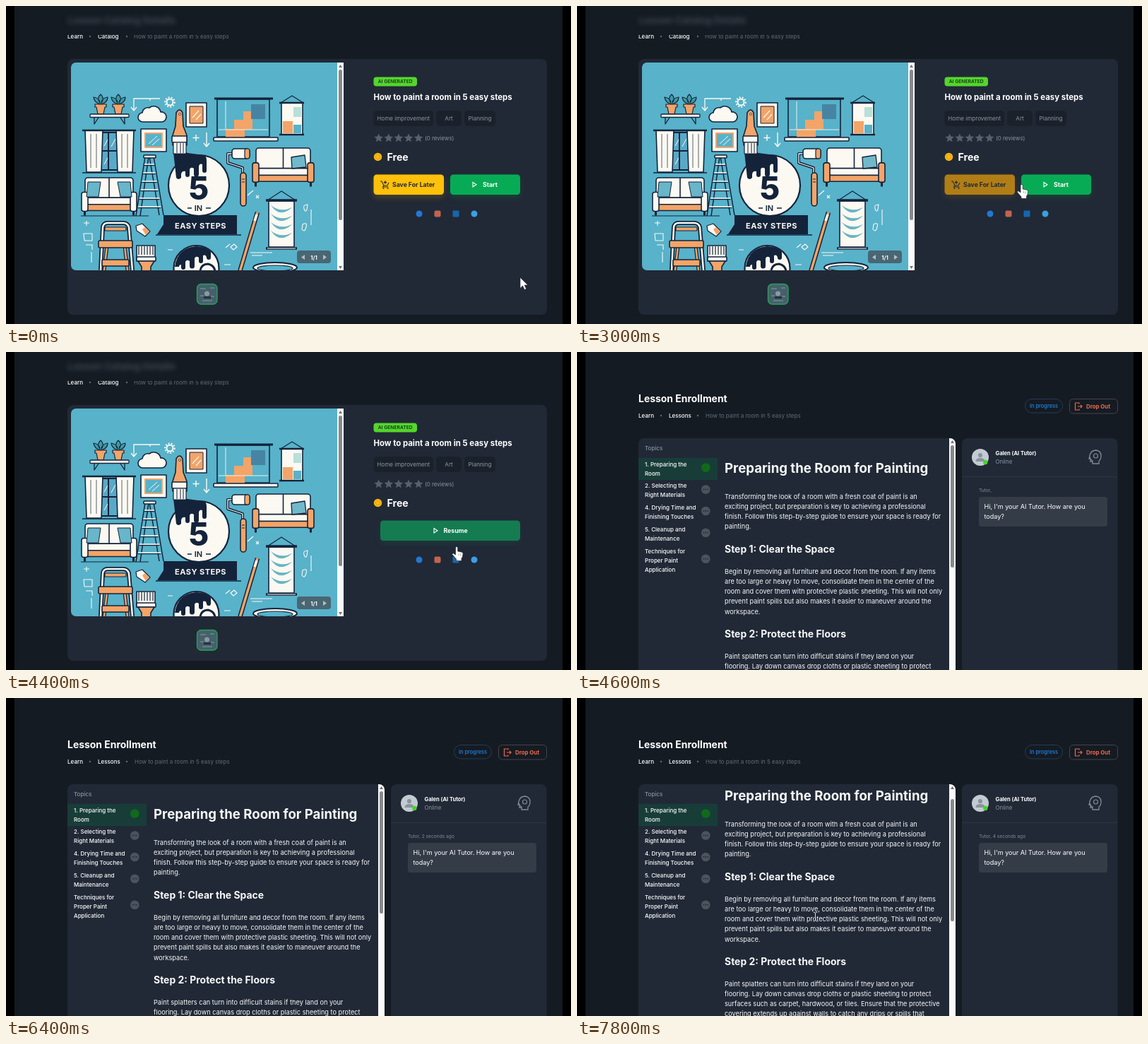
These frames come from a looping animation (800x450 px, 8000 ms). An HTML page with a canvas:

```html
<!DOCTYPE html>
<html lang="en">
<head>
<meta charset="utf-8">
<title>Lesson walkthrough</title>
<style>
html, body { margin: 0; width: 100%; height: 100%; overflow: hidden; background: #000; }
canvas { display: block; width: 800px; height: 450px; }
</style>
</head>
<body>
<canvas id="stage" width="800" height="450"></canvas>
<script>
const ctx = document.getElementById('stage').getContext('2d');
const LOOP = 8000, STEP = 200, PAGE_SWITCH = 4600;
const PAGE = '#151b23', CARD = '#212936', WHITE = '#fff', MUTED = '#8a95a1', DIM = '#626c77';
const NAVY = '#14233a', CREAM = '#fbf9f2', ORANGE = '#f3a468', SKY = '#57b2ca', BLUE = '#4784a4';

// Drawing helpers
function paint(fill, stroke, width = 1.6) {
  if (fill) { ctx.fillStyle = fill; ctx.fill(); }
  if (stroke) { ctx.strokeStyle = stroke; ctx.lineWidth = width; ctx.stroke(); }
}
function box(x, y, w, h, fill, r = 0, stroke, width) {
  ctx.beginPath();
  ctx.roundRect(x, y, w, h, r);
  paint(fill, stroke, width);
}
function disc(x, y, r, fill, stroke, width) {
  ctx.beginPath();
  ctx.arc(x, y, r, 0, Math.PI * 2);
  paint(fill, stroke, width);
}
function oval(x, y, rx, ry, fill, stroke, width) {
  ctx.beginPath();
  ctx.ellipse(x, y, rx, ry, 0, 0, Math.PI * 2);
  paint(fill, stroke, width);
}
function shape(path, fill, stroke, width) {
  const p = new Path2D(path);
  if (fill) { ctx.fillStyle = fill; ctx.fill(p); }
  if (stroke) { ctx.strokeStyle = stroke; ctx.lineWidth = width || 1.6; ctx.stroke(p); }
}
function line(path, color = NAVY, width = 1.6) { shape(path, null, color, width); }
function text(str, x, y, size, color = WHITE, weight = 400, align = 'left') {
  ctx.font = `${weight} ${size}px Inter, sans-serif`;
  ctx.textAlign = align;
  ctx.fillStyle = color;
  ctx.fillText(str, x, y);
}
function lines(rows, x, y, gap, size, color, weight) {
  rows.forEach((row, i) => text(row, x, y + i * gap, size, color, weight));
}
function clipped(x, y, w, h, r, draw) {
  ctx.save();
  ctx.beginPath();
  ctx.roundRect(x, y, w, h, r);
  ctx.clip();
  draw();
  ctx.restore();
}
function at(x, y, draw) {
  ctx.save();
  ctx.translate(x, y);
  draw();
  ctx.restore();
}

function breadcrumb(section, end, y) {
  text('Learn', 87, y, 8.1, WHITE, 500);
  text(section, 130, y, 8, WHITE, 500);
  disc(119, y - 3, 1.2, DIM);
  disc(171, y - 3, 1.2, DIM);
  text('How to paint a room in 5 easy steps', end, y, 7.97, DIM);
}
function scrollbar(x, top, bottom, thumbY, thumbH) {
  box(x, top, 9, bottom - top, '#fafafa');
  box(x + 2, thumbY, 5, thumbH, '#88898b', 2.5);
  shape(`M${x + 2} ${top + 7}h5l-2.5-4z`, '#707274');
  shape(`M${x + 2} ${bottom - 6}h5l-2.5 4z`, '#707274');
}

// Illustration
function plant(x) {
  shape(`M${x} 139q-9-2-10-10q8 1 9 8q-5-7 1-12q6 5 1 12q1-7 9-8q0 8-10 10`, '#3f9aa5', NAVY, 1.2);
  shape(`M${x - 8} 139h16v4h-2l-2 10h-8l-2-10h-2z`, ORANGE, NAVY, 1.2);
}
function sofa(x, y, w, h, armColor) {
  box(x + 5, y, w - 10, h * .62, CREAM, 4, NAVY);
  line(`M${x + w / 2} ${y}v${h * .55}`);
  box(x + 8, y + h * .52, w - 16, h * .18, CREAM, 2, NAVY);
  box(x + 4, y + h * .7, w - 8, h * .16, ORANGE, 1, NAVY);
  for (const armX of [x, x + w - 9]) {
    box(armX, y + h * .38, 9, h * .5, armColor, 3, NAVY);
    line(`M${armX + 4.5} ${y + h * .88}v${h * .11}`, NAVY, 3);
  }
}
function room() {
  plant(134);
  plant(159);
  box(119, 153, 55, 4.5, CREAM, 1, NAVY, 1.3);
  line('M125 158v9l6-9M168 158v9l-6-9', NAVY, 1.3);
  line('M218 131h-37v16m-4-4l4 5l4-5M204 131v3', CREAM, 1.3);
  disc(232, 136, 4.5, null, CREAM, 2);
  ctx.setLineDash([2, 2.2]);
  disc(232, 136, 6.8, null, CREAM, 2);
  ctx.setLineDash([]);
  shape('M194 164a6.5 6.5 0 0 1-1-13a8 8 0 0 1 10-7a10 10 0 0 1 16 6a7 7 0 0 1 2 14z', CREAM, NAVY);

  box(255, 137, 29, 34, CREAM, 0, NAVY);
  box(260, 142, 19, 24, ORANGE, 0, NAVY, 1);
  line('M264 158l9-10M269 161l7-8', CREAM, 1.2);
  box(191, 174, 36, 32, CREAM, 0, NAVY);
  box(197, 180, 24, 20, SKY, 0, ORANGE, 2);
  line('M202 195l12-11M207 197l10-9', CREAM, 1);

  // Window and curtains
  box(131, 179, 28, 53, '#58a9c7', 0, NAVY, 2);
  line('M145 179v53M131 205h28', NAVY, 2);
  line('M139 198l5-9M149 199l6-11M139 224l5-9', CREAM, 1);
  for (const x of [112, 156]) {
    shape(`M${x} 176h25l-2 59h-21z`, CREAM, NAVY);
    line(`M${x + 8} 181v48M${x + 16} 181v48`, NAVY, .7);
  }
  line('M108 176h76', NAVY, 2.5);
  line('M108 236h76', NAVY, 1.6);

  sofa(107, 243, 78, 54, CREAM);
  shape('M116 249h18l-3 21h-17zM158 249h18l2 21h-16z', '#69b5ca', NAVY, 1);
  line('M106 297h96', NAVY, 1.2);

  // Ladder
  line('M197 213l-13 84M202 213l-12 84M209 213l14 83M203 213l14 83', NAVY, 1.5);
  for (let i = 0; i < 6; i++) {
    const y = 224 + i * 12, half = 7 + i * 1.8;
    line(`M${203 - half} ${y}h${half * 2}`, CREAM, 1.3);
    line(`M${203 - half} ${y + 1.6}h${half * 2}`, NAVY, 1.2);
  }
  box(195, 211, 17, 4, CREAM, 1, NAVY);

  // Wall chart
  box(299, 132, 74, 53, SKY, 0, NAVY);
  shape('M311 186v-12h12v-13h13v-12h13v26h-11v11z', ORANGE);
  line('M301 175h70M311 174v-39', CREAM, .9);
  box(347, 139, 20, 21, BLUE);
  line('M295 131h83', NAVY, 3);
  box(294, 186, 91, 5, CREAM, 1, NAVY);
  line('M389 137l16-10l16 10', NAVY, 1.2);
  box(390, 137, 30, 45, CREAM, 0, NAVY);
  box(392, 163, 14, 17, ORANGE);
  box(407, 143, 11, 14, '#b8dfd8');
  box(407, 168, 11, 12, SKY);
  line('M387 137h35M387 182h35', NAVY, 2.5);

  line('M269 182v9M264.5 186.5h9M284 179v20m-4-5l4 5l4-5', CREAM, 1.4);
  line('M250 283l4 4m0-4l-4 4M354 268l4 4m0-4l-4 4M342 268l8-7', CREAM, 1.2);

  // Roller
  line('M321 209h-7v13l21 7v8', NAVY, 4);
  line('M321 209h-7v13l21 7v8', CREAM, 1.3);
  box(320, 202, 25, 14, CREAM, 4, NAVY);
  box(338, 202, 7, 14, ORANGE, 3, NAVY, 1.2);
  box(332, 236, 8, 47, ORANGE, 4, NAVY);
  line('M334 245h4M334 249h4', NAVY, 1);

  sofa(349, 201, 87, 55, ORANGE);
  shape('M404 214l19-3l2 17l-20 2z', '#70b8ca', NAVY, 1.3);

  // Hanging poster
  line('M370 275l20-13l20 13', NAVY, 1.2);
  box(372, 276, 36, 65, CREAM, 0, NAVY);
  for (let i = 0; i < 4; i++) {
    shape(`M375 ${282 + i * 12}q14 11 30 3q-17 16-30-3`, '#69b5c4');
  }
  line('M368 275h44M368 343h44', NAVY, 3.5);
  line('M370 343h40', CREAM, 1);
}
function tools() {
  // Headline medallion
  disc(273, 254, 43, CREAM, NAVY, 2.2);
  shape('M237 207q10-4 20 1l23 3q4 1 4 8v14a3 3 0 0 1-6 0v-9q-4-2-5 3v11a3.5 3.5 0 0 1-7 0v-8q-4-3-6 1v8a3 3 0 0 1-6 0v-5q-5-1-6 4v5q-4 4-7 0z', NAVY);
  shape('M241 151q5-8 9 0l1 19l5 13v14h-20v-14l4-13z', ORANGE, NAVY);
  box(235, 184, 21, 9, CREAM, 1, NAVY);
  box(237, 193, 18, 16, CREAM, 0, NAVY, 1.2);
  line('M242 194v14M247 194v14M251 194v14', NAVY, 1);
  disc(246, 153, 1.5, CREAM, NAVY, .8);
  text('5', 273, 274, 45, NAVY, 800, 'center');
  text('IN', 272.5, 290, 11, NAVY, 600, 'center');
  line('M257 286h6M283 286h7', NAVY, 1.5);
  shape('M223 296h104v27h-113l9-14z', NAVY);
  line('M212 324h121', NAVY, 1.5);
  ctx.letterSpacing = '0.5px';
  text('EASY STEPS', 275.5, 314.5, 11, CREAM, 700, 'center');
  ctx.letterSpacing = '0px';

  // Step stool
  line('M134 374l3-61q1-6 7-6h22q6 0 8 6l5 61', NAVY, 6);
  line('M134 374l3-61q1-6 7-6h22q6 0 8 6l5 61', CREAM, 2.5);
  line('M143 340l-4 34M168 340l4 34', NAVY, 5);
  line('M143 340l-4 34M168 340l4 34', ORANGE, 2.5);
  box(131, 332, 48, 10, ORANGE, 2, NAVY);
  box(136, 359, 38, 9, ORANGE, 1, NAVY);
  box(140, 313, 30, 5, ORANGE, 1, NAVY, 1.2);

  shape('M184 311l9-3l11 11l-7 7l-12-8z', CREAM, NAVY, 1.2);
  shape('M193 316l4-3l6 6l-5 5z', ORANGE);
  shape('M185 339h26v22h-26z', CREAM, NAVY);
  for (let x = 188; x < 210; x += 4) line(`M${x} 340v12`, NAVY, 1.2);
  box(185, 355, 27, 6, CREAM, 1, NAVY);
  shape('M187 361h23l-5 8v6h-13v-6z', ORANGE, NAVY);

  // Lower medallion
  disc(269.5, 371, 32, CREAM, NAVY, 2.2);
  shape('M239 369q4-27 30-29q15 0 21 8v8a3 3 0 0 1-6 0q-1-5-5-3v8a3 3 0 0 1-6 0v-5q-4-3-6 1v11a3 3 0 0 1-7 0v-7q-4-3-6 1v8a3 3 0 0 1-6 0v-4q-3 0-3 3z', NAVY);
  line('M275 374q2-9 11-9q9 2 10 10', NAVY, 3);

  line('M356 292l-25 84', NAVY, 6.5);
  line('M356 292l-25 84', ORANGE, 3.5);
  line('M355 295l-3 9', CREAM, 3.5);
  oval(381, 370, 31, 7, CREAM, NAVY, 2);
  oval(381, 371, 25, 4, SKY, NAVY, 1.2);

  // Loose marks
  line('M110 322h12v10h-11zM113 338h9v7M114 304h0v7M121 348v15M427 281q-7 0-5 6t4 1zM432 288v22M420 309q7-4 5 4t-6 3zM110 307h8', CREAM, 1.1);
  line('M311 342l6-5M309 366h9M346 349h31M348 353h15M229 345h7M318 341l5-4l4 4l-5 4z', CREAM, 1.1);
}
function illustration() {
  clipped(92, 80, 386, 294, [7, 0, 0, 7], () => {
    box(92, 80, 386, 294, SKY);
    ctx.lineJoin = 'round';
    room();
    tools();
    scrollbar(469, 80, 374, 90, 213);
  });
  box(412, 346, 48, 18, 'rgba(72,90,102,.86)', 4);
  shape('M423 352v7l-5-3.5zM449 352v7l5-3.5z', '#b7bdc2');
  text('1/1', 436, 358.5, 7.6, WHITE, 700, 'center');
}

// Catalog page
function star(x, y) {
  ctx.beginPath();
  for (let i = 0; i < 10; i++) {
    const a = i * Math.PI / 5 - Math.PI / 2, r = i % 2 ? 3 : 6.6;
    ctx.lineTo(x + r * Math.cos(a), y + r * Math.sin(a));
  }
  ctx.closePath();
  paint('#56616d');
}
function button(x, w, label, labelX, color, ink) {
  ctx.save();
  ctx.shadowColor = color + '30';
  ctx.shadowBlur = 8;
  ctx.shadowOffsetY = 4;
  box(x, 238.5, w, 28.5, color, 4.5);
  ctx.restore();
  text(label, labelX, 255.7, 8.7, ink, 700);
}
function playIcon(x) { line(`M${x} 249.5v6.5l5-3.25z`, WHITE, 1.1); }
function actions(t) {
  if (t >= 3800) {
    button(530, 198, 'Resume', 619.5, '#157b51', WHITE);
    playIcon(606);
    return;
  }
  const saveHover = t >= 2200 && t < 3200;
  button(520.5, 99.5, 'Save For Later', 547, saveHover ? '#b17d16' : '#ffc10a', '#212b36');
  line('M530 248h2l3 6h5l2-4M535 254l-1.5 2h8M537 247v4m-2-2l2 2l2-2', '#212b36', 1.1);
  disc(534.5, 258, 1, '#212b36');
  disc(540.5, 258, 1, '#212b36');
  button(629, 99, 'Start', 675, t >= 3200 ? '#157b51' : '#08ab55', WHITE);
  playIcon(661);
}
function catalogPage(t) {
  ctx.save();
  ctx.filter = 'blur(3px)';
  text('Lesson Catalog Details', 88, 25, 13.6, '#3f464f', 700);
  ctx.restore();
  clipped(80, 41, 300, 12, 0, () => breadcrumb('Catalog', 181, 46));

  box(87, 75, 679, 362, CARD, 8);
  illustration();
  box(270.5, 393.5, 28.5, 28.5, '#46606c', 6, '#23a657', 1.3);
  line('M275 400h8M289 399h6M275 410h5M290 411h5M278 417h14', '#6f868f', 1.3);
  disc(284.5, 407, 3.5, '#8b9a9f');
  box(280, 411, 10, 3, '#26333f');

  box(520.5, 100.5, 61.5, 13, '#54d62c', 4);
  text('AI GENERATED', 551.2, 109.3, 6.75, '#14321c', 600, 'center');
  text('How to paint a room in 5 easy steps', 520.5, 133, 11.4, WHITE, 700);
  for (const [label, x, w] of [['Home improvement', 520.5, 84.5], ['Art', 609, 36], ['Planning', 649, 44]]) {
    box(x, 148, w, 22, '#1a212b', 5);
    text(label, x + w / 2, 162, 8.1, MUTED, 400, 'center');
  }
  for (let i = 0; i < 5; i++) star(527.7 + i * 14.1, 187);
  text('(0 reviews)', 593, 189.5, 7.85, MUTED);
  disc(526.5, 213.5, 5.7, '#fdb913');
  disc(526.5, 213.5, 3.4, null, '#d99a15', .9);
  text('Free', 539.5, 219, 14.1, WHITE, 700);
  actions(t);

  disc(585, 294, 4.5, '#2277d6');
  box(606.5, 289.5, 9, 9, '#c2644f', 2);
  box(632.5, 289.5, 9, 9, '#1467ae', 1);
  disc(663, 294, 4.5, '#399fe5');
}

// Lesson page
const topics = [
  [162, 163.5, ['1. Preparing the', 'Room']],
  [192, 194.5, ['2. Selecting the', 'Right Materials']],
  [223, 225, ['4. Drying Time and', 'Finishing Touches']],
  [254, 255.7, ['5. Cleanup and', 'Maintenance']],
  [284.5, 292.7, ['Techniques for', 'Proper Paint', 'Application']],
];
const article = [
  [171, 18.6, 700, ['Preparing the Room for Painting']],
  [207.5, 9.2, 400, [
    'Transforming the look of a room with a fresh coat of paint is an',
    'exciting project, but preparation is key to achieving a professional',
    'finish. Follow this step-by-step guide to ensure your space is ready for',
    'painting.']],
  [284, 13.95, 700, ['Step 1: Clear the Space']],
  [314, 9.2, 400, [
    'Begin by removing all furniture and decor from the room. If any items',
    'are too large or heavy to move, consolidate them in the center of the',
    'room and cover them with protective plastic sheeting. This will not only',
    'prevent paint spills but also makes it easier to maneuver around the',
    'workspace.']],
  [404, 13.95, 700, ['Step 2: Protect the Floors']],
  [434, 9.2, 400, [
    'Paint splatters can turn into difficult stains if they land on your',
    'flooring. Lay down canvas drop cloths or plastic sheeting to protect',
    'surfaces such as carpet, hardwood, or tiles. Ensure that the protective',
    'covering extends up against walls to catch any drips or spills that']],
];
function messageAge(t) {
  if (t < 5600) return 'Tutor,';
  if (t < 6400) return 'Tutor, 1 second ago';
  const seconds = t < 7200 ? 2 : t < 7800 ? 3 : 4;
  return `Tutor, ${seconds} seconds ago`;
}
function tutorPanel(t) {
  box(545, 122, 220.5, 340, CARD, 8);
  line('M545 176.5h220', '#2c3541', 1);
  disc(571, 149, 12, '#c3cbd2');
  disc(571, 146, 3.1, '#8a949e');
  shape('M564.5 155q0-5 6.5-5t6.5 5z', '#8a949e');
  disc(578.3, 156, 3.2, '#46d32b');
  text('Galen (AI Tutor)', 592.5, 145.5, 7.55, WHITE, 700);
  text('Online', 592.5, 158, 7.9, MUTED);
  line('M730 158v-4q-5-3-4-8q2-7 9-7q7 1 7 8q0 5-3 7v4zM726 147l-1 4h2v4h3', '#7f8994', 1.3);
  disc(734.5, 147, 3, null, '#7f8994', 1.2);
  text(messageAge(t), 569, 198, 6.65, '#808b97');
  box(569, 205, 182, 42, '#343c48', 4);
  lines(["Hi, I'm your AI Tutor. How are you", 'today?'], 576.5, 222, 14.3, 9.05);
}
function lessonPage(t) {
  const scroll = 26 * Math.max(0, Math.min(1, (t - 7300) / 500));
  text('Lesson Enrollment', 87, 71.3, 13.95, WHITE, 700);
  breadcrumb('Lessons', 182, 93);
  box(634.5, 66.5, 53, 19.5, null, 9.7, '#223c58', 1);
  text('In progress', 661, 79, 7.45, '#1b86e8', 500, 'center');
  box(697.5, 66.5, 68, 20.5, null, 5, '#484349', 1);
  line('M711 73.5v-1.5h-5.5v10h5.5v-1.5M709 77h6m-2-2l2 2l-2 2', '#e9694b', 1.2);
  text('Drop Out', 721, 79.7, 7.85, '#e9694b', 700);

  clipped(87, 122, 449, 340, 8, () => {
    box(87, 122, 449, 340, CARD);
    text('Topics', 96, 139, 8, MUTED, 500);
    box(87, 150, 112, 31, '#183d39');
    topics.forEach(([y, dotY, rows], i) => {
      lines(rows, 96, y, 13, 8, WHITE, 500);
      disc(182.3, dotY, 6.3, i ? '#4b535d' : '#11691b');
      if (i) for (let d = -1; d < 2; d++) disc(182.3 + d * 2.8, dotY, .9, '#252d38');
    });
    for (const [y, size, weight, rows] of article) {
      lines(rows, 209, y - scroll, 14.15, size, '#f7f8f9', weight);
    }
    scrollbar(527, 122, 470, 132 + scroll * .42, 173);
  });
  tutorPanel(t);
}

// Pointers
function arrow() {
  shape('M0 0v15.5l3.6-3.4l2.5 5.4l2.6-1.2l-2.4-5.2h4.7z', WHITE, '#1a1f26', .7);
}
function hand() {
  shape('M-3-8a1.6 1.6 0 0 1 3.2 0v5l6 1.3q1.6.5 1.4 2.5l-.7 4.2l-1.4 2v3.5h-7.5v-2.5l-5.6-6.5q-.5-2 1.8-1.6l2.8 2z', WHITE, '#20262e', .7);
  line('M1.5 0v3M4 .5v3', '#8b9096', .7);
}
function beam() {
  const path = 'M-3-6q3 0 3 2v9q0 2-3 2M3-6q-3 0-3 2v9q0 2 3 2';
  line(path, '#20262e', 2);
  line(path, '#d8dbde', 1);
}
const route = [
  [0, 728, 384, arrow], [1200, 728, 384, arrow], [1800, 618, 259, arrow],
  [2200, 590, 257, hand], [2400, 567, 258, hand], [2600, 609, 259, hand],
  [2800, 609, 259, hand], [3000, 631, 262, hand], [3400, 652, 260, hand],
  [3800, 645, 275, hand], [4400, 639.5, 285, hand], [PAGE_SWITCH, 639.5, 285, hand],
  [6600, 186, 31, arrow], [7000, 290, 215, beam], [7400, 337.5, 309, beam], [LOOP, 337.5, 309, beam],
];
function pointer(t) {
  if (t >= PAGE_SWITCH && t < 6600) return;
  const i = route.findLastIndex(stop => stop[0] <= t);
  const [t0, x0, y0, draw] = route[i];
  const [t1, x1, y1] = route[i + 1];
  const k = (t - t0) / (t1 - t0);
  at(x0 + (x1 - x0) * k, y0 + (y1 - y0) * k, draw);
}

function render(t) {
  box(0, 0, 800, 450, '#000');
  box(12, 0, 776, 450, PAGE);
  if (t < PAGE_SWITCH) catalogPage(t); else lessonPage(t);
  pointer(t);
}

let shown = -1;
function tick() {
  const t = Math.floor(performance.now() % LOOP / STEP) * STEP;
  if (t !== shown) render(shown = t);
  requestAnimationFrame(tick);
}
tick();
</script>
</body>
</html>
```
